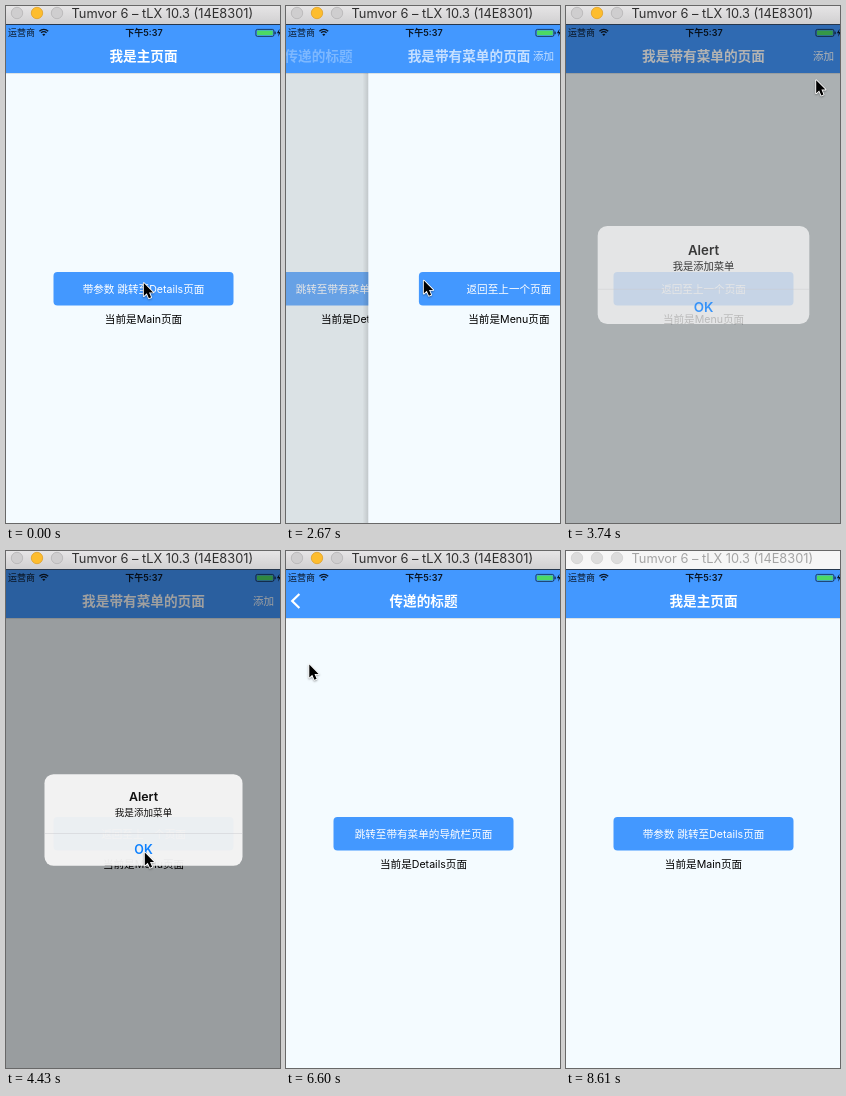
Animation of 274 by 517 pixels, one loop 8.65 s. Source, as an HTML page with a canvas:

```html
<!DOCTYPE html>
<html lang="zh-CN">
<head>
<meta charset="utf-8">
<title>Navigation demo</title>
<style>
html, body { margin: 0; width: 100%; height: 100%; overflow: hidden; background: #f4fbff; }
canvas { display: block; width: 274px; height: 517px; }
</style>
</head>
<body>
<canvas id="stage"></canvas>
<script>
const W = 274, H = 517, LOOP = 8650, MID = 137.5, SCREEN_W = 275;
const BLUE = '#4398ff', PAGE = '#f4fbff';
const FONT = 'Inter, "Noto Sans CJK SC", "Noto Sans CJK", "Noto Sans CJK JP", sans-serif';

const canvas = document.getElementById('stage');
const ctx = canvas.getContext('2d');
const dpr = window.devicePixelRatio || 1;
canvas.width = W * dpr;
canvas.height = H * dpr;

const pages = [
  { title: '我是主页面', button: '带参数 跳转至Details页面', label: '当前是Main页面' },
  { title: '传递的标题', button: '跳转至带有菜单的导航栏页面', label: '当前是Details页面' },
  { title: '我是带有菜单的页面', button: '返回至上一个页面', label: '当前是Menu页面' }
];

// start, from page, to page, time already elapsed at start
const moves = [[1335, 0, 1, 0], [2590, 1, 2, 34], [5800, 2, 1, 0], [6950, 1, 0, 0]];
// page, press time, release time
const presses = [[0, 1170, 1335], [1, 2440, 2600], [2, 5630, 5800]];
// time, x, y of the pointer tip
const path = [
  [0, 137, 275.5], [1840, 137, 275.5], [1960, 137, 273], [2950, 137, 273],
  [3380, 260.5, 50], [3650, 260.5, 50],
  [4140, 138, 300], [4750, 138, 300], [5130, 126.5, 264], [5160, 126.5, 264],
  [5330, 140, 286], [6130, 140, 286], [6600, 22.5, 112], [6800, 9, 47],
  [7080, 9, 47], [7430, 39, 44], [7490, 39, 44], [8060, 276, 519]
];

const clamp = v => Math.max(0, Math.min(1, v));
const lerp = (a, b, u) => a + (b - a) * u;
const inOut = u => u < .5 ? 2 * u * u : 1 - 2 * (1 - u) * (1 - u);

function bezier(a, b, s) {
  const r = 1 - s;
  return 3 * r * r * s * a + 3 * r * s * s * b + s * s * s;
}

function navEase(u) {
  if (u <= 0 || u >= 1) return clamp(u);
  let lo = 0, hi = 1;
  for (let i = 0; i < 24; i++) {
    const s = (lo + hi) / 2;
    if (bezier(.2833, .31833, s) < u) lo = s; else hi = s;
  }
  return bezier(.99, .99, lo);
}

function depthAt(t) {
  let depth = 0;
  for (const [start, from, to, lead] of moves) {
    if (t >= start) depth = lerp(from, to, navEase(clamp((t - start + lead) / 500)));
  }
  return depth;
}

function buttonAlpha(page, t) {
  for (const [i, down, up] of presses) {
    if (i === page && t >= down) return t < up ? .5 : lerp(.5, 1, inOut(clamp((t - up) / 150)));
  }
  return 1;
}

function text(str, x, cy, size, color, weight = 400, align = 'center') {
  ctx.font = `${weight} ${size}px ${FONT}`;
  ctx.textAlign = align;
  ctx.fillStyle = color;
  ctx.fillText(str, x, cy + size * .37);
}

function rect(x, y, w, h, color) {
  ctx.fillStyle = color;
  ctx.fillRect(x, y, w, h);
}

function round(x, y, w, h, r, color) {
  ctx.beginPath();
  ctx.roundRect(x, y, w, h, r);
  ctx.fillStyle = color;
  ctx.fill();
}

function poly(points, close) {
  ctx.beginPath();
  points.forEach(([x, y]) => ctx.lineTo(x, y));
  if (close) ctx.closePath();
}

function drawPage(i, x, edge, t) {
  const { button, label } = pages[i];
  rect(edge, 67, W - edge, H - 67, PAGE);
  ctx.globalAlpha = buttonAlpha(i, t);
  round(x + 47.5, 266, 180, 33.5, 4, BLUE);
  ctx.globalAlpha = 1;
  text(button, x + MID, 282.8, 10.6, '#fff');
  text(label, x + MID, 313, 10.6, '#000');
}

const lagged = p => p + .12 * p * (1 - p);

function drawPages(depth, t) {
  const low = Math.floor(depth), p = depth - low;
  drawPage(low, -82.5 * lagged(p), 0, t);
  if (p === 0) return;
  const x = SCREEN_W * (1 - p);
  const edge = x - Math.min(3, x);
  rect(0, 67, W, H - 67, `rgba(0,0,0,${.15 * p})`);
  const shade = ctx.createLinearGradient(edge - 6, 0, edge, 0);
  shade.addColorStop(0, 'rgba(0,0,0,0)');
  shade.addColorStop(1, 'rgba(0,0,0,.12)');
  rect(edge - 6, 67, 6, H - 67, shade);
  drawPage(low + 1, x, edge, t);
}

function drawStatus() {
  text('运营商', 2, 26.5, 9, '#0b1726', 400, 'left');
  text('下午5:37', 138, 26.5, 9, '#0b1726', 600);
  ctx.strokeStyle = ctx.fillStyle = '#0b1726';
  ctx.lineWidth = 1.3;
  for (const r of [6.2, 3.9]) {
    ctx.beginPath();
    ctx.arc(37.8, 29.6, r, -Math.PI * .75, -Math.PI * .25);
    ctx.stroke();
  }
  ctx.beginPath();
  ctx.moveTo(37.8, 30);
  ctx.arc(37.8, 30, 2.2, -Math.PI * .75, -Math.PI * .25);
  ctx.fill();

  ctx.lineWidth = .7;
  ctx.beginPath();
  ctx.roundRect(249.9, 23.4, 18, 7, 1.5);
  ctx.stroke();
  round(251, 24.5, 15.8, 4.8, .7, '#4cd964');
  rect(268.6, 25.6, 1, 2.6, '#0b1726');
  poly([[273.6, 22.8], [270.8, 27.2], [272.8, 27.2], [272, 30.8], [275, 26], [273, 26]], true);
  ctx.fill();
}

function drawHeader(depth) {
  rect(0, 18, W, 49, BLUE);
  rect(0, 67, W, 1, 'rgba(0,0,0,.1)');
  pages.forEach(({ title }, i) => {
    const rel = i - depth;
    if (Math.abs(rel) >= 1) return;
    ctx.globalAlpha = 1 - Math.abs(rel);
    const shift = rel < 0 ? -lagged(-rel) : rel;
    text(title, MID + 146.7 * shift, 50, 13.65, '#fff', 600);
  });
  ctx.globalAlpha = clamp(depth - 1);
  text('添加', 247, 50, 10.6, '#fff', 400, 'left');
  ctx.globalAlpha = clamp(1 - 2 * Math.abs(depth - 1));
  poly([[13.4, 43], [6.2, 50], [13.4, 57]]);
  ctx.strokeStyle = '#fff';
  ctx.lineWidth = 2.2;
  ctx.stroke();
  ctx.globalAlpha = 1;
  drawStatus();
}

function drawAlert(t) {
  const age = t - 3650;
  if (age < 0 || t > 4700) return;
  const out = 1 - inOut(clamp((t - 4380) / 300));
  const alpha = (1 - Math.exp(-age * .0154)) * out;
  const scale = 1 + .2 * Math.exp(-age * .0117);
  rect(0, 18, W, H - 18, `rgba(0,0,0,${.4 * alpha})`);
  ctx.save();
  ctx.globalAlpha = alpha;
  ctx.translate(MID, 269);
  ctx.scale(scale, scale);
  round(-99, -45.8, 198, 91.6, 9, '#f8f8f8');
  if (t >= 4280 && t < 4400) round(-99, 13.5, 198, 32.3, [0, 0, 9, 9], '#e6e6e6');
  text('Alert', 0, -23.5, 12.4, '#000', 600);
  text('我是添加菜单', 0, -7.8, 9.6, '#000');
  rect(-99, 13, 198, .5, '#c9c9cc');
  text('OK', 0, 29.8, 12.5, '#007aff', 600);
  ctx.restore();
}

function drawBar(active) {
  if (active) {
    const fill = ctx.createLinearGradient(0, 0, 0, 18);
    fill.addColorStop(0, '#e6e5e6');
    fill.addColorStop(1, '#d1d0d1');
    rect(0, 0, W, 18, fill);
  } else {
    rect(0, 0, W, 18, '#f6f6f6');
  }
  rect(0, 18, W, 1, '#26374d');
  [11, 31, 51].forEach((x, i) => {
    const lit = active && i === 1;
    ctx.beginPath();
    ctx.arc(x, 7, 5.7, 0, 7);
    ctx.fillStyle = lit ? '#fdbd2e' : active ? '#cfcecf' : '#dcdcdc';
    ctx.fill();
    ctx.strokeStyle = lit ? '#e0a026' : active ? '#b5b4b5' : '#d0d0d0';
    ctx.lineWidth = .8;
    ctx.stroke();
  });
  text('Tumvor 6 – tLX 10.3 (14E8301)', 65.5, 7.4, 12.8, active ? '#2f2f2f' : '#a4a4a4', 400, 'left');
}

function drawPointer(t) {
  const k = path.findIndex(stop => stop[0] > t);
  if (k < 0) return;
  const [t0, x0, y0] = path[k - 1], [t1, x1, y1] = path[k];
  const u = clamp((t - t0) / (t1 - t0));
  const s = u * u * (3 - 2 * u);
  ctx.save();
  ctx.translate(lerp(x0, x1, s) + .8, lerp(y0, y1, s) + 1.6);
  ctx.scale(.9, .9);
  poly([[0, 0], [0, 14.4], [3.3, 11.3], [5.7, 16.8], [8.1, 15.8], [5.8, 10.4], [10.3, 10.4]], true);
  ctx.lineJoin = 'round';
  ctx.strokeStyle = '#fff';
  ctx.lineWidth = 2;
  ctx.shadowColor = 'rgba(0,0,0,.35)';
  ctx.shadowBlur = 2 * dpr;
  ctx.shadowOffsetY = dpr;
  ctx.stroke();
  ctx.shadowColor = 'transparent';
  ctx.fillStyle = '#000';
  ctx.fill();
  ctx.restore();
}

function draw(t) {
  const depth = depthAt(t);
  ctx.setTransform(dpr, 0, 0, dpr, 0, 0);
  drawPages(depth, t);
  drawHeader(depth);
  drawAlert(t);
  drawBar(t < 8610);
  drawPointer(t);
}

const begin = performance.now();
function tick() {
  draw((performance.now() - begin) % LOOP);
  requestAnimationFrame(tick);
}
tick();
</script>
</body>
</html>
```
